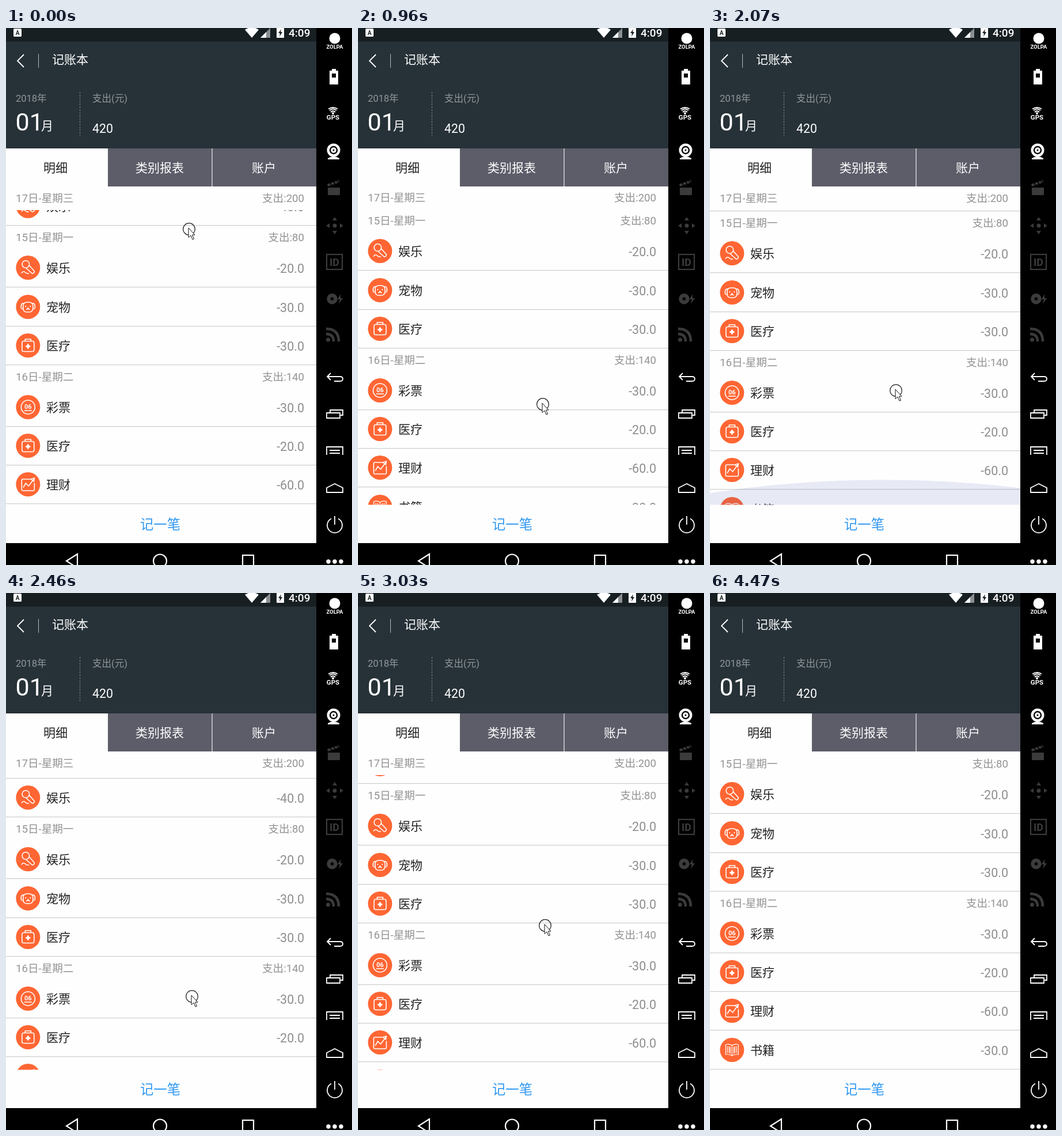
An HTML page for the animation above (8 s loop, 601x932 px).

```html
<!DOCTYPE html>
<html lang="zh-CN">
<head>
<meta charset="utf-8">
<style>
  html, body { margin: 0; width: 100%; height: 100%; overflow: hidden; background: #000; }
  svg { display: block; width: 601px; height: 932px; font-family: Roboto, "Noto Sans CJK SC", "Noto Sans CJK", sans-serif; }
  .end { text-anchor: end; }
  .mid { text-anchor: middle; }
  .day { font-size: 18.6px; fill: #939393; }
  .name { font-size: 21px; fill: #222; }
  .cost { font-size: 21.5px; fill: #8e8e8e; }
  .rule { stroke: #cfcfcf; stroke-width: 1.3; }
  .line { fill: none; stroke: #fff; stroke-width: 1.8; }
  .bold { stroke-width: 2.2; }
  .glyph { fill: none; stroke: #fff; stroke-width: 1.6; stroke-linecap: round; stroke-linejoin: round; }
</style>
</head>
<body>
<svg viewBox="0 0 601 932">
  <defs>
    <clipPath id="pane"><rect y="275" width="539" height="552.5"/></clipPath>
    <g id="mic">
      <circle cx="-4" cy="-6" r="6.3"/>
      <path d="M2-4L11 6Q11 10 7 10L-3 1M-11 9q3-4 6-1t6 2"/>
    </g>
    <g id="dog">
      <rect x="-8.5" y="-8" width="17" height="17" rx="6"/>
      <path d="M-7-6Q-13-7-12 2Q-11 4-8.5 3M7-6Q13-7 12 2Q11 4 8.500 3M-2.500 4.500L0 3L2.500 4.500"/>
      <path d="M-4-1v.1M4-1v.1M0 2v.5" stroke-width="2.2"/>
    </g>
    <g id="kit">
      <rect x="-10.5" y="-7.5" width="21" height="18" rx="3"/>
      <path d="M-5-8v-3h10v3"/>
      <path d="M0-2.5v8M-4 1.5h8" stroke-width="3" stroke-linecap="butt"/>
    </g>
    <g id="ball">
      <circle r="12"/>
      <text class="mid" y="3" font-size="11" font-weight="700" fill="#fff" stroke="none">06</text>
      <path d="M-6 6H6"/>
    </g>
    <g id="chart">
      <path d="M4-9H-9Q-11-9-11-7V9Q-11 11-9 11H9Q11 11 11 9V-2M-8 5L-4-2L1 3L10-9M5-9l6-2l-1 6z"/>
    </g>
    <g id="book" stroke-width="1.2">
      <path d="M0-8Q-5-11-11-9V8Q-5 7 0 10Q5 7 11 8V-9Q5-11 0-8V9M-8-6V5M-5-6V5M-3-5V6M8-6V5M5-6V5M3-5V6"/>
    </g>
  </defs>

  <rect width="539" height="894" fill="#fefefe"/>

  <g clip-path="url(#pane)">
    <g id="list"></g>
    <g id="pinned"><rect width="539" height="41" fill="#fefefe"/></g>
    <ellipse id="glow" cx="301" rx="809" fill="#3f51b5"/>
  </g>

  <!-- app header -->
  <rect width="539" height="209" fill="#273238"/>
  <rect width="539" height="23.5" fill="#171f22"/>
  <rect x="13" y="1" width="14" height="14" rx="1.5" fill="#fff"/>
  <text x="20" y="12" class="mid" font-size="10" font-weight="700" fill="#171f22">A</text>
  <path d="M415 3Q427-5 439 3L427 17z" fill="#fff"/>
  <path d="M442 17L459 0V17z" fill="#8a8f91"/>
  <path d="M442 17L452 7V17z" fill="#fff"/>
  <path d="M470 0h13v17h-13z" fill="#fff"/>
  <path d="M478 2l-5 7h3l-1 6 5-8h-3z" fill="#171f22"/>
  <text x="491" y="15" font-size="19" font-weight="500" fill="#fff">4:09</text>
  <path d="M31 46L20 57L31 68" class="line"/>
  <path d="M56.5 45v24" stroke="#b4b9bb"/>
  <g fill="#fff">
    <text x="80" y="62" font-size="21">记账本</text>
    <text x="16.5" y="178" font-size="43">01</text>
    <text x="61" y="177" font-size="21">月</text>
    <text x="150" y="182" font-size="21.3">420</text>
  </g>
  <g fill="#92989b" font-size="16.5">
    <text x="17" y="128">2018年</text>
    <text x="150" y="128">支出(元)</text>
  </g>
  <path d="M128.5 111v77" stroke="#7b8285" stroke-dasharray="3 2"/>

  <!-- tabs -->
  <path d="M177 209H539V275H177z" fill="#5c5d69"/>
  <path d="M358 209V275" stroke="#e4e4e6" stroke-width="1.3"/>
  <g class="mid" font-size="21" fill="#fff">
    <text x="86" y="250" fill="#222">明细</text>
    <text x="267" y="250">类别报表</text>
    <text x="448" y="250">账户</text>
    <text x="268" y="870" font-size="23.3" fill="#2f97f3">记一笔</text>
  </g>

  <!-- navigation bar -->
  <path d="M0 894H539V0H601V932H0z"/>
  <g class="line bold">
    <path d="M124 913L105 925L124 937z"/>
    <circle cx="267.5" cy="925" r="11.5"/>
    <rect x="411" y="915" width="19" height="20"/>
  </g>

  <!-- side toolbar -->
  <g fill="#fff" class="mid" font-weight="700">
    <circle cx="571" cy="18" r="9.5"/>
    <text x="571" y="36" font-size="9.5">ZOLPA</text>
    <path d="M566 71h7v3h4v24h-15V74h4zM566 79v7h7v-7z" fill-rule="evenodd"/>
    <text x="568" y="159" font-size="11.5">GPS</text>
    <circle cx="568" cy="148" r="2"/>
    <path d="M564 146q4-4 8 0M562 143q6-5 12 0M560 140.500q8-5 16 0" class="line"/>
    <circle cx="569" cy="212" r="11.5"/>
    <circle cx="569" cy="212" r="6" fill="none" stroke="#000" stroke-width="2.4"/>
    <circle cx="569" cy="212" r="1.5" fill="#000"/>
    <path d="M559 226Q569 220 579 226V228H559z"/>
  </g>
  <g fill="#3b3b3b">
    <path d="M559 277h21v13h-21zM558 271l20-7 1 4-20 7z"/>
    <path d="M563 269l3 4M569 267l3 4M575 265l3 4" stroke="#000" stroke-width="1.5"/>
    <circle cx="571" cy="343" r="3.5"/>
    <path d="M571 328l4 6h-8zM571 358l4-6h-8zM556 343l6-4v8zM586 343l-6-4v8z"/>
    <rect x="557" y="393" width="27" height="26" fill="none" stroke="#3b3b3b" stroke-width="2.2"/>
    <text x="570.5" y="413" class="mid" font-size="18" font-weight="700">ID</text>
    <circle cx="566.5" cy="470" r="6" fill="none" stroke="#3b3b3b" stroke-width="6.5"/>
    <path d="M581 462l-5 9h4l-2 8 7-10h-4z"/>
    <circle cx="559.5" cy="541" r="3.5"/>
    <path d="M556 531q13 0 13 13M556 522q22 0 22 22" fill="none" stroke="#3b3b3b" stroke-width="4.5"/>
  </g>
  <g class="line">
    <path d="M564 599L558 605L564 611M558 605H580Q585 605 585 609T580 613H570"/>
    <path d="M557 668h23v9h-23zM563 668v-5h22v9h-5"/>
    <path d="M557 741v-14h28v14M562 733h18M562 738h18"/>
    <path d="M557 806v-8L571 791L585 798v8z"/>
    <path d="M565 851.5A13 13 0 1 0 577 851.5M571 847v15"/>
  </g>
  <g fill="#fff">
    <circle cx="560" cy="926" r="3.7"/>
    <circle cx="571" cy="926" r="3.7"/>
    <circle cx="582" cy="926" r="3.7"/>
  </g>

  <g id="cursor">
    <circle id="press" r="10.3" fill="none" stroke="#222" stroke-width="1.2"/>
    <path d="M-1-2V14.5L3 11L6 18L8.5 17L5.5 10H10z" fill="#fff" stroke="#111"/>
  </g>
</svg>
<script>
const HEAD = 39.6, ROW = 67.3, TOP = 275, END = 276.2, BOTTOM = 827, LOOP = 8000, LAST = 4470;
const el = id => document.getElementById(id);
const move = (id, x, y) => el(id).setAttribute('transform', `translate(${x} ${y})`);

const header = (y, day, sum) =>
  `<g transform="translate(0 ${Math.round(y + 27.4)})">
     <text class="day" x="17">${day}</text>
     <text class="day end" x="518">支出:${sum}</text>
   </g>`;

const row = (y, icon, name, cost) =>
  `<g transform="translate(0 ${Math.round(y + ROW / 2)})">
     <circle cx="38.3" r="21" fill="#ff6633"/>
     <use href="#${icon}" x="38.3" class="glyph"/>
     <text class="name" x="70" y="8">${name}</text>
     <text class="cost end" x="518" y="9">-${cost}.0</text>
     <path class="rule" d="M0 ${ROW / 2}H539"/>
   </g>`;

const group = (y, day, sum, rows) =>
  header(y, day, sum) + rows.map((r, i) => row(y + HEAD + i * ROW, ...r)).join('');

const fun = ['mic', '娱乐'], med = ['kit', '医疗'], pet = ['dog', '宠物'];
el('list').innerHTML =
  row(-2 * ROW, ...med, 60) + row(-ROW, ...fun, 40) +
  group(0, '15日-星期一', 80, [[...fun, 20], [...pet, 30], [...med, 30]]) +
  group(HEAD + 3 * ROW, '16日-星期二', 140,
    [['ball', '彩票', 30], [...med, 20], ['chart', '理财', 60], ['book', '书籍', 30]]);
el('pinned').innerHTML += header(0, '17日-星期三', 200);

// The screen refreshes every 120 ms; each fourth tick and the busy spells take 150 ms.
const within = (t, a, b) => t >= a && t < b;
const ticks = [0];
for (let i = 0, t = 0; t < LAST; i++) {
  const slow = i % 4 === 1 || within(t, 510, 1560) || within(t, 2580, 3330);
  ticks.push(t += slow ? 150 : 120);
}

// Mouse path: time, x, y
const path = [[0, 318, 349], [510, 330, 620], [810, 322, 710], [960, 321, 653], [1110, 322, 600],
  [1410, 322, 562], [1800, 323, 580], [2580, 323, 722], [3030, 325, 577], [3330, 329, 490],
  [3600, 332, 473], [4350, 463, 907]];

function pointer(t) {
  const i = path.findIndex(p => p[0] > t);
  if (i < 0) return path.at(-1).slice(1);
  const [t0, x0, y0] = path[i - 1], [t1, x1, y1] = path[i], f = (t - t0) / (t1 - t0);
  return [x0 + (x1 - x0) * f, y0 + (y1 - y0) * f];
}

// The list coasts to rest, then follows the mouse in three grips until its end is reached.
function scroll(t, mouseY) {
  if (t <= 810) return 358.5 - 15.3 * (1 - Math.min(1, t / 510)) ** 2;
  if (t >= 3330) return END;
  const grip = t <= 1410 ? 339.5 : t < 2730 ? 311 : 246;
  return Math.max(END, mouseY - grip);
}

// Overscroll glow swells and fades between two times.
const swell = (t, a, b) => within(t, a, b) ? .72 * Math.sqrt(Math.sin(Math.PI * (t - a) / (b - a))) : 0;

function draw(now) {
  const t = ticks.findLast(k => k <= now % LOOP);
  const [x, y] = pointer(t), offset = scroll(t, y);
  move('list', 0, Math.round(offset));
  move('pinned', 0, Math.round(Math.min(TOP, offset - HEAD)));

  const k = swell(t, 960, 2190) + swell(t, 3180, 3960), glow = el('glow');
  glow.setAttribute('ry', 809 * k);
  glow.setAttribute('cy', BOTTOM + 701 * k);
  glow.setAttribute('opacity', Math.min(.12, k * .3));

  const pressed = t < 120 || within(t, 810, 2730) || within(t, 2880, 3600);
  move('cursor', x, y);
  el('cursor').style.display = t < LAST ? '' : 'none';
  el('press').style.display = pressed ? '' : 'none';
}

const start = performance.now();
(function tick() {
  draw(performance.now() - start);
  requestAnimationFrame(tick);
})();
</script>
</body>
</html>
```
